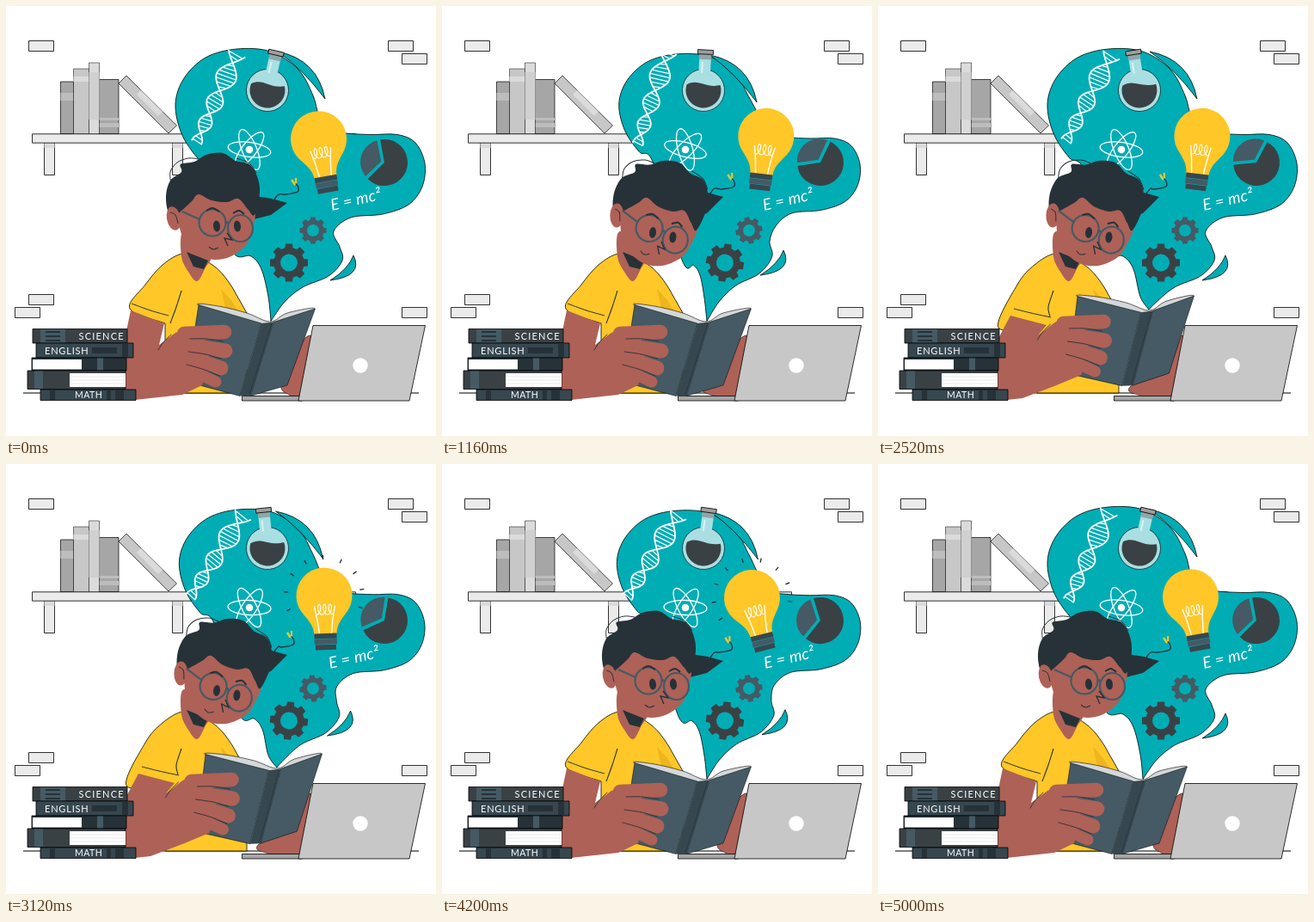
Recreate the animation shown at these times as an HTML page with a canvas. Size 500 px wide and 500 px high, loop 5.08 s.

```html
<!DOCTYPE html>
<html lang="en">
<head>
<meta charset="utf-8">
<title>Reading and imagining</title>
<style>
html, body { margin: 0; width: 100%; height: 100%; overflow: hidden; background: #fff; }
canvas { display: block; width: 500px; height: 500px; }
</style>
</head>
<body>
<canvas id="stage" width="500" height="500"></canvas>
<script>
const ctx = document.getElementById('stage').getContext('2d');
const LOOP = 5080, LAST = 5000, TAU = Math.PI * 2, DEG = Math.PI / 180;
const TEAL = '#00adb5', YELLOW = '#ffc727', SKIN = '#ae6157', DARK = '#263238', COAL = '#3a4145',
  INK = '#37474f', SLATE = '#455a64', PALE = '#ebebeb', LIGHT = '#dbdbdb', GREY = '#c7c7c7', MID = '#a6a6a6';

const lerp = (a, b, k) => a + (b - a) * k;
function ramp(t, from, to) {
  const s = Math.max(0, Math.min(1, (t - from) / (to - from)));
  return s * s * (3 - 2 * s);
}
// Slow swing, once per loop.
const sway = (t, phase) => Math.sin(TAU * t / LAST + phase);

function poseAt(t) {
  const rise = ramp(t, 1600, 2300), back = ramp(t, 3400, 4000);
  return {
    nod: ramp(t, 300, 1000) - back,
    lift: rise - back,
    dip: 4 * rise * (1 - rise),
    swell: .5 + .5 * Math.cos(TAU * t / 2500)
  };
}

function path(pts, closed) {
  ctx.beginPath();
  pts.forEach(p => ctx.lineTo(p[0], p[1]));
  if (closed) ctx.closePath();
}
function poly(pts, color, edge) {
  path(pts, true);
  fill(color, edge);
}
// Smooth line through all points.
function curve(pts, closed) {
  const n = pts.length;
  const p = i => closed ? pts[(i + n) % n] : pts[Math.max(0, Math.min(n - 1, i))];
  ctx.beginPath();
  ctx.moveTo(...pts[0]);
  for (let i = 0; i < (closed ? n : n - 1); i++) {
    const a = p(i - 1), b = p(i), c = p(i + 1), d = p(i + 2);
    ctx.bezierCurveTo(b[0] + (c[0] - a[0]) / 6, b[1] + (c[1] - a[1]) / 6,
      c[0] - (d[0] - b[0]) / 6, c[1] - (d[1] - b[1]) / 6, c[0], c[1]);
  }
}
function stroke(color, width) {
  ctx.strokeStyle = color;
  ctx.lineWidth = width;
  ctx.stroke();
}
function fill(color, edge) {
  ctx.fillStyle = color;
  ctx.fill();
  if (edge) stroke('#000', edge);
}
function rect(x, y, w, h, color, edge) {
  ctx.beginPath();
  ctx.rect(x, y, w, h);
  fill(color, edge);
}
function oval(x, y, rx, ry = rx, angle = 0) {
  ctx.beginPath();
  ctx.ellipse(x, y, rx, ry, angle, 0, TAU);
}
function line(pts, color, width) {
  curve(pts);
  stroke(color, width);
}
function placed(x, y, angle, draw) {
  ctx.save();
  ctx.translate(x, y);
  ctx.rotate(angle);
  draw();
  ctx.restore();
}
function label(text, x, y, size, spacing, style = '') {
  ctx.font = `${style} ${size}px Lato, sans-serif`;
  ctx.letterSpacing = spacing + 'px';
  ctx.fillStyle = '#fff';
  ctx.fillText(text, x, y);
}

function drawRoom() {
  [[26, 40], [444, 40], [460, 55], [26, 335], [10, 350], [460, 350]]
    .forEach(([x, y]) => rect(x + .5, y + .5, 29, 12, PALE, .8));
  for (const x of [44.5, 193.5]) {
    rect(x, 159, 12, 37.5, PALE, .8);
    rect(x, 159, 12, 6, LIGHT);
  }
  rect(30.5, 148.8, 376, 10.4, PALE, .8);
  rect(63.5, 88, 15, 60.5, MID, .7);
  rect(63.5, 101, 15, 9, '#bdbdbd');
  rect(78.5, 73, 18, 75.5, GREY, .5);
  rect(78.5, 82, 18, 6, LIGHT);
  rect(108, 85.5, 23, 63, MID, .7);
  rect(108, 130, 23, 3, '#bdbdbd');
  rect(108, 136, 23, 5, '#bdbdbd');
  rect(96.5, 66, 12, 82.5, LIGHT, .5);
  rect(96.5, 77, 12, 55, '#d0d0d0');
  poly([[131, 90], [140, 81], [198.5, 139], [189, 148]], GREY, .7);
  poly([[152, 103], [157, 98], [182, 123], [177, 128]], LIGHT);
  line([[20, 450], [480, 450]], '#000', 1.2);
}

// Every lobe shrinks about its own centre as the bubble breathes.
const LOBES = [
  { at: [305, 345], scale: [.6, .8], pts: [[305, 338], [297, 306], [285, 291], [262, 283]] },
  { at: [345, 110], scale: [.94, .9], pts: [[240, 192], [222, 176], [204, 148], [197, 114], [207, 84],
    [232, 60], [268, 50], [308, 53], [340, 74], [357, 104]] },
  { at: [475, 195], scale: [.92, .9], pts: [[364, 128], [376, 144], [395, 148], [425, 149.5], [455, 149.5],
    [476, 159], [487, 183], [484, 210], [468, 231], [438, 242], [401, 246], [381, 262]] },
  { at: [300, 345], scale: [.92, 1.1], pts: [[388, 280], [391, 296], [375, 314], [345, 327], [324, 344]] }
];
function splash(x, y, from, outer, to, inner) {
  placed(x, y, 0, () => {
    ctx.beginPath();
    ctx.moveTo(...from);
    ctx.quadraticCurveTo(...outer, ...to);
    ctx.quadraticCurveTo(...inner, ...from);
    fill(TEAL, .8);
  });
}
function drawBubble({ lift, dip, swell }) {
  const shrink = 1 - swell;
  const tip = [308 + 7 * lift, 366.5 - 13.5 * lift + 14 * dip];
  const edge = LOBES.flatMap(({ at, scale, pts }) =>
    pts.map(p => p.map((v, i) => at[i] + (v - at[i]) * lerp(1, scale[i], shrink))));
  curve([tip, ...edge, tip]);
  fill(TEAL, .8);
  splash(-5 * shrink, 4 * shrink, [316, 53], [362, 62], [371, 108], [344, 72]);
  splash(-7 * shrink, -6 * shrink, [404, 290], [416, 314], [377, 319], [398, 306]);
}

function drawDna(t) {
  placed(245, 107, (26 - 8 * sway(t, .2)) * DEG, () => {
    const side = s => lerp(14, 6, s / 114) * Math.cos(Math.PI * (.22 + .022 * s + .0001 * s * s));
    for (const dir of [1, -1]) {
      ctx.beginPath();
      for (let s = 0; s <= 114; s += 2) ctx.lineTo(dir * side(s), s - 57);
      stroke('#fff', 1.8);
    }
    ctx.beginPath();
    for (let s = 2; s < 114; s += 4.6) {
      const w = side(s);
      if (Math.abs(w) > 2.5) { ctx.moveTo(-w, s - 58); ctx.lineTo(w, s - 56); }
    }
    stroke('#fff', 1.2);
  });
}

function drawFlask(t) {
  const tilt = (2 + 11 * sway(t, Math.PI / 2)) * DEG;
  placed(304, 98, tilt, () => {
    oval(0, 0, 24.5);
    fill('#a9dfe2', .6);
    rect(-6.8, -42, 13.6, 24, '#a9dfe2');
    rect(-7, -43, 14, 7, '#8fa6aa');
    rect(-9, -47, 18, 5, '#9e9e9e', .8);
    line([[-3, -33], [-3, -20]], '#d9f2f3', 2);
  });
  placed(304, 98, tilt * .35, () => {
    ctx.beginPath();
    ctx.arc(0, 0, 20.5, -18 * DEG, 198 * DEG);
    ctx.bezierCurveTo(-6, -14, 2, -2, 19.5, -6.3);
    fill(COAL);
  });
}

function drawAtom(t) {
  placed(283, 167, (8 + 7 * sway(t, 0)) * DEG, () => {
    for (let i = 0; i < 3; i++) { oval(0, 0, 25, 8.5, i * TAU / 6); stroke('#fff', 1.3); }
    oval(0, 0, 4.3);
    fill('#fff');
  });
}

function drawRays(t) {
  const phase = (t % 1250) / 1250;
  const grow = Math.min(1, (phase - .25) / .1, (.8 - phase) / .1);
  if (grow <= 0) return;
  for (let i = 0; i < 9; i++) {
    placed(0, 0, (-200 + i * 27.5) * DEG, () => {
      path([[42, 0], [42 + 5 * grow, 0]]);
      stroke(DARK, 1.4);
    });
  }
}
function drawBulb(t) {
  const swing = sway(t, -.75);
  placed(370.3 + 10 * swing, 153 - 2.5 * swing, (-1.5 + 13 * swing) * DEG, () => {
    drawRays(t);
    ctx.beginPath();
    ctx.arc(0, 0, 32.5, 145 * DEG, 35 * DEG);
    ctx.bezierCurveTo(17, 31, 14, 34, 13, 45);
    ctx.lineTo(-13, 45);
    ctx.bezierCurveTo(-14, 34, -17, 31, -26.6, 18.6);
    fill(YELLOW);
    for (const side of [-1, 1]) line([[7 * side, 44], [9 * side, 28], [12 * side, 12]], '#fff', 1.4);
    ctx.beginPath();
    for (let a = 0; a <= 3 * TAU; a += .2) ctx.lineTo(a - 9.4 + 3 * Math.sin(a), 16 + 6 * Math.cos(a));
    stroke('#fff', 1.1);
    [INK, SLATE, INK].forEach((color, i) => rect(i < 2 ? -13 : -12, 44 + 6.5 * i, i < 2 ? 26 : 24, 6, color));
  });
}

function drawPie(t) {
  const half = 62 * DEG;
  placed(440, 182, (217 + 27 * sway(t, -.8)) * DEG, () => {
    ctx.beginPath();
    ctx.moveTo(0, 0);
    ctx.arc(0, 0, 27, half, TAU - half);
    fill(COAL);
    ctx.beginPath();
    ctx.moveTo(4, 0);
    ctx.arc(2, 0, 26, -half + .08, half - .08);
    fill(SLATE);
  });
}

function gear(x, y, r, hole, angle, color) {
  placed(x, y, angle, () => {
    ctx.beginPath();
    for (let i = 0; i < 8; i++) {
      const a = i * TAU / 8;
      [[-.26, .8], [-.18, 1], [.18, 1], [.26, .8]].forEach(([d, k]) =>
        ctx.lineTo(r * k * Math.cos(a + d), r * k * Math.sin(a + d)));
    }
    fill(color);
    oval(0, 0, hole);
    fill(TEAL);
  });
}

function drawCap(t, nod) {
  const y = 229 - 7 * nod;
  poly([[327, y], [308, 243 - 2 * nod], [284, 249], [284, 220], [309, y - 5]], DARK);
  const tx = 333 + 3 * sway(t, .8), ty = 206 - 6 * nod;
  line([[312, y - 4], [317, y - 10], [tx - 10, ty + 13], [tx + 4, ty + 10], [tx + 4, ty + 3], [tx, ty]], DARK, 1.3);
  line([[tx + 1, ty + 2], [tx - 3, ty - 4]], YELLOW, 2.3);
  line([[tx + 2, ty], [tx + 2, ty - 6]], YELLOW, 2);
}

function drawIdeas(t, { nod, swell }) {
  drawDna(t);
  drawFlask(t);
  drawAtom(t);
  drawBulb(t);
  drawPie(t);
  const turn = 10 * (1 - swell) * DEG;
  gear(329, 298.5, 22.3, 10, turn, COAL);
  gear(357, 261, 15.8, 7, -turn, SLATE);
  placed(374.5 + 4.5 * swell, 238, -13 * DEG, () => label('E = mc²', 0, 0, 18.5, .2, 'italic'));
  drawCap(t, nod);
}

function drawBody(lift) {
  const m = (x, y, ux, uy) => [lerp(x, ux, lift), lerp(y, uy, lift)];
  const hem = m(185, 369, 186, 371);
  curve([[240, 301], [226, 293], [205, 288], [182, 301], [162, 324], m(144, 352, 140, 374), hem]);
  [[185, 450], [280, 450], [280, 357], [263, 327]].forEach(p => ctx.lineTo(...p));
  ctx.quadraticCurveTo(251, 308, 240, 301);
  fill(YELLOW, .8);
  poly([[250, 329], [262, 342], [270, 355], [255, 351]], '#efb51f');
  line([m(146, 346, 158, 352), m(168, 354, 178, 357), m(189, 360, 201, 362)], DARK, 1);
  line([m(191, 369, 200, 361), [198, 350], [204, 331]], DARK, 1.1);
  curve([[207, 262], [204, 291], [212, 309], [222, 320], [231, 306], [239, 285]], true);
  fill(SKIN);
  poly([[210, 286], [235, 296], [230, 306], [218, 303]], DARK);
}

function drawSkull() {
  curve([[200, 232], [203, 262], [212, 279], [226, 290], [243, 295], [262, 291], [279, 278],
    [286, 262], [289, 236], [270, 210], [225, 205]], true);
  fill(SKIN);
  curve([[189, 240], [186, 221], [191, 203], [204, 193], [203, 184], [219, 181], [233, 173], [252, 171],
    [267, 180], [283, 184], [292, 198], [295, 217], [289, 243], [281, 236], [270, 224], [257, 228],
    [239, 226], [224, 219], [216, 227], [204, 238], [198, 242]], true);
  fill(DARK);
  line([[192, 207], [191, 193], [199, 182], [212, 177], [224, 178]], DARK, 1);
  line([[268, 177], [283, 183], [291, 194]], DARK, 1);
  oval(195, 247, 8, 14, -.2);
  fill(SKIN);
  line([[191, 240], [197, 243], [200, 253]], DARK, 1);
}
function drawFace() {
  line([[225, 248], [205, 239]], SLATE, 2.3);
  for (const [x, y, rx] of [[240, 252, 15.5], [272.5, 258.5, 14.5]]) {
    oval(x, y, rx, 15.5);
    stroke(SLATE, 2.2);
  }
  line([[255, 253], [257, 251], [259, 254]], SLATE, 2.2);
  for (const x of [245, 269]) { oval(x, 256, 4, 6.5, -.12); fill(DARK); }
  line([[233, 238], [240, 235], [248, 239]], DARK, 2);
  line([[264, 241], [271, 238], [277, 242]], DARK, 2);
  path([[257, 264], [263, 272], [254, 270], [258, 279]]);
  stroke(DARK, 1.3);
  line([[236, 280], [241, 283], [247, 281]], DARK, 1.1);
}
// The skull turns a little further than the face.
function drawHead({ nod }) {
  [[drawSkull, 5], [drawFace, 0]].forEach(([draw, shift]) =>
    placed(256 + shift * nod, 255 + 10 * nod, 13 * nod * DEG, () => {
      ctx.translate(-256, -255);
      draw();
    }));
}

function drawRightArm({ lift, nod }) {
  const wrist = 329 - 17 * nod - 10 * lift;
  curve([[346, 388], [357, 387], [350, 425], [341, 455], [wrist, 452], [wrist - 9, 443], [330, 420]], true);
  fill(SKIN, .5);
}

function drawLaptop() {
  rect(274.5, 453.5, 70, 5.5, MID, .8);
  poly([[357, 371.5], [487.5, 371.5], [469, 459], [340, 459]], GREY, .8);
  oval(412, 418, 8.7);
  fill('#fff');
}

function drawBook({ lift, dip }) {
  placed(291.5 + 8 * lift + 2 * dip, 349.5 - 12.5 * lift + 12.5 * dip, (4.8 * dip - 2.1 * lift) * DEG, () => {
    ctx.translate(-291.5, -349.5);
    curve([[224, 348], [247, 349], [280, 357], [307, 367], [327, 357], [359, 352], [320, 374], [290, 372]], true);
    fill('#d5d8d9', .6);
    poly([[224, 347.5], [297, 369], [272, 453.5], [210, 437]], SLATE, .5);
    poly([[311, 367.5], [359.5, 352], [327, 441], [284, 453.5]], SLATE, .5);
    poly([[297, 369], [311, 367.5], [285, 453.5], [272, 453.5]], INK);
    line([[309, 369], [283, 452]], DARK, .7);
  });
}

function drawHand({ lift, dip }) {
  const p = (x, y) => [x + 8.5 * lift, y - 12 * lift + 6 * dip];
  const m = (x, y, ux, uy) => [lerp(x, ux, lift), lerp(y, uy, lift)];
  ctx.lineCap = 'round';
  poly([m(145, 354, 154, 360), m(184, 369, 196, 371), m(178, 394, 186, 383), p(197, 380), p(214, 373),
    p(230, 380), p(236, 410), p(228, 441), m(205, 452, 205, 442), [168, 456], [150, 458], [136, 448], [137, 392]], SKIN);
  [[254, 379, 16.5], [255, 401, 17], [250, 421, 17], [244, 437, 13]]
    .forEach(([x, y, width], i) => line([p(207, 381 + 13 * i), p(x, y)], SKIN, width));
  for (let i = 0; i < 3; i++)
    line([p(214 - 2 * i, 387 + 15 * i), p(233 - i, 387 + 18 * i), p(252 - 2 * i, 390 + 20 * i)], DARK, .9);
  line([p(177, 400), p(183, 391), p(192, 382)], DARK, .9);
  ctx.lineCap = 'butt';
}

function drawStack() {
  rect(31, 375.5, 110, 16.5, COAL, .8);
  rect(40, 376, 29, 15.5, SLATE);
  for (const y of [378, 383, 388]) rect(46, y, 17, 2, DARK);
  label('SCIENCE', 84.5, 388, 11, 1.2);
  rect(35, 392, 113, 17, INK, .8);
  rect(100, 397, 29, 7, DARK);
  rect(135, 392.5, 7, 16, DARK);
  label('ENGLISH', 45, 404.5, 11, .8);
  rect(30, 409, 110, 15, DARK, .8);
  rect(31, 411, 57, 11.5, '#fff');
  rect(106, 409.5, 7, 14, SLATE);
  rect(25, 424, 114, 21.5, COAL, .8);
  rect(33, 424.5, 10, 20.5, SLATE);
  rect(74, 427, 65, 16, '#fff');
  for (const y of [431, 435, 439]) line([[76, y], [138, y]], '#dedede', .7);
  rect(40, 446, 111, 12.5, INK, .8);
  for (const [x, w] of [[51, 6], [117, 5], [127, 10]]) rect(x, 446.5, w, 11.5, DARK);
  label('MATH', 80, 456, 10.5, .5);
}

function draw(t) {
  const pose = poseAt(t);
  ctx.fillStyle = '#fff';
  ctx.fillRect(0, 0, 500, 500);
  drawRoom();
  drawBubble(pose);
  drawIdeas(t, pose);
  drawBody(pose.lift);
  drawHead(pose);
  drawRightArm(pose);
  drawLaptop();
  drawBook(pose);
  drawHand(pose);
  drawStack();
}

const start = performance.now();
function tick() {
  const t = (performance.now() - start) % LOOP;
  draw(Math.min(LAST, Math.floor(t / 40) * 40));
  requestAnimationFrame(tick);
}
tick();
</script>
</body>
</html>
```
